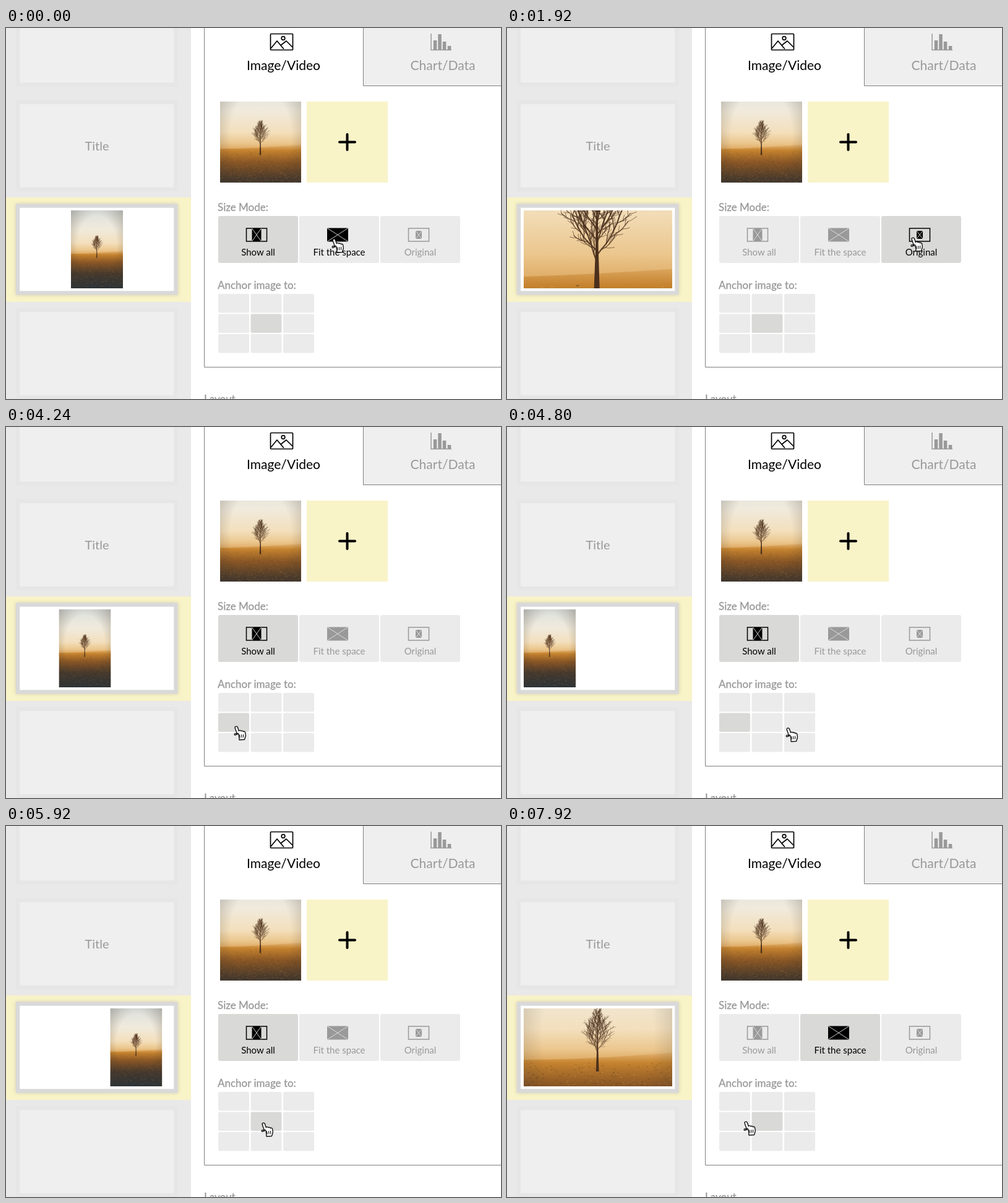
An HTML page that plays this animation: 800 by 600 pixels, repeating every 8 s.

```html
<!DOCTYPE html>
<html lang="en">
<head>
<meta charset="utf-8">
<title>Image size mode and anchor</title>
<style>
  html, body { margin: 0; width: 100%; height: 100%; overflow: hidden; background: #fff; }
  svg { display: block; }
  text { font-family: Lato, sans-serif; fill: #999; }
  .head { font-size: 21px; text-anchor: middle; }
  .label { font-size: 17px; stroke: #999; stroke-width: .3px; }
  .slide { fill: #efefef; stroke: #e6e6e6; stroke-width: 6.5px; }
  .slide.current { fill: #fff; stroke: #d9d9d9; filter: drop-shadow(0 0 3px #0002); }
  .edge { fill: none; stroke: #808080; }
  .box { fill: #ebebeb; }
  .on.box, .on .box { fill: #d9d9d7; }
  .mode { --ink: #999; }
  .mode.on, .mode.hover { --ink: #000; }
  .mode text { font-size: 15px; text-anchor: middle; fill: var(--ink); }
  .frame { fill: none; stroke: var(--ink); stroke-width: 1.5px; }
  .solid { fill: var(--ink); }
  .cross { stroke: #e4e4e4; stroke-width: .9px; }
</style>
</head>
<body>
<svg id="stage" width="800" height="600" viewBox="0 0 800 600">
  <defs>
    <linearGradient id="sky" x2="0" y2="1">
      <stop offset="0" stop-color="#dde1de"/>
      <stop offset=".4" stop-color="#f0eadc"/>
      <stop offset=".7" stop-color="#f3dfbc"/>
      <stop offset=".85" stop-color="#ebc68d"/>
      <stop offset="1" stop-color="#d39340"/>
    </linearGradient>
    <linearGradient id="field" x2="0" y2="1">
      <stop offset="0" stop-color="#d3974a" stop-opacity=".2"/>
      <stop offset=".1" stop-color="#c5832f"/>
      <stop offset=".3" stop-color="#8b5725"/>
      <stop offset=".6" stop-color="#47392c"/>
      <stop offset="1" stop-color="#27333b"/>
    </linearGradient>
    <radialGradient id="vignette" cx=".5" cy=".45" r=".75">
      <stop offset=".5" stop-color="#40372c" stop-opacity="0"/>
      <stop offset="1" stop-color="#40372c" stop-opacity=".4"/>
    </radialGradient>
    <symbol id="photo" viewBox="0 0 240 360" preserveAspectRatio="none">
      <rect width="240" height="216" fill="url(#sky)"/>
      <path d="M0 200Q110 200 240 188V360H0Z" fill="url(#field)"/>
      <g id="furrows"></g>
      <g id="tree" fill="none" stroke="#4b301d" stroke-linecap="round"></g>
      <rect width="240" height="360" fill="url(#vignette)"/>
    </symbol>
    <clipPath id="slideArea"><rect x="27" y="295" width="240" height="126"/></clipPath>
    <clipPath id="thumbArea"><rect x="346" y="119" width="131" height="131"/></clipPath>
  </defs>

  <rect width="299" height="600" fill="#e9e9e9"/>
  <rect y="274" width="299" height="169" fill="#f9f3c8"/>
  <rect class="slide" x="19" y="-43" width="255.5" height="134.5"/>
  <rect class="slide" x="19" y="120" width="255.5" height="141"/>
  <rect class="slide current" x="19" y="287.5" width="255.5" height="141"/>
  <rect class="slide" x="19" y="456" width="255.5" height="141"/>
  <text x="147" y="198" font-size="20" text-anchor="middle">Title</text>
  <g clip-path="url(#slideArea)"><use id="picture" href="#photo"/></g>

  <rect x="577" y="-2" width="230" height="96" fill="#efefef"/>
  <path class="edge" d="M320.5 0V548.5H800M577.5 0V93.5H800"/>
  <g fill="none" stroke="#000" stroke-width="1.7" stroke-linejoin="round">
    <rect x="427.500" y="9.500" width="36" height="26" rx="1"/>
    <path d="M428 33L438 21L449 34M444 28L453 21L463 31"/>
    <circle cx="448" cy="16.500" r="2.800"/>
  </g>
  <path d="M687 9V35.500H720M693.500 35V20M701 35V10M708.500 35V22M716.500 35V29"
    fill="none" stroke="#999" stroke-width="1.500"/>
  <path d="M693.500 35V20M701 35V10M708.500 35V22M716.500 35V29" stroke="#999" stroke-width="5.500"/>
  <text class="head" x="448.5" y="68" style="fill:#000">Image/Video</text>
  <text class="head" x="706" y="68">Chart/Data</text>

  <g clip-path="url(#thumbArea)"><use href="#photo" x="346" y="86" width="131" height="196.500"/></g>
  <rect x="486" y="119" width="131" height="131" fill="#f9f3c8"/>
  <path d="M539 184.500h25M551.500 172v25" stroke="#000" stroke-width="4" stroke-linecap="round"/>

  <text class="label" x="342" y="296">Size Mode:</text>
  <g id="modes"></g>
  <text class="label" x="342" y="422">Anchor image to:</text>
  <g id="cells"></g>
  <text class="label" x="320" y="606">Layout</text>

  <g id="cursor" stroke="#111" stroke-linejoin="round">
    <path d="M-6-10.500C-4.500-11.500-3-10.500-2.500-9L-.7-3.500C0-4.800 2.500-4.600 3-3.200C4-4.200 6-3.800 6.300-2.300C7.500-3.200 9.300-2.500 9.600-1L10.300 3C10.600 6 9 7.500 8.500 10.500L0 11C-1-8.500-4 5.500-7.500 3C-8.500 1.500-7 0-5 1L-3.200 2.300L-6.800-8C-7.200-9-7-10-6-10.500Z" fill="#fff" stroke-width="1.400"/>
    <path d="M.5 2.500l.8 5M3.500 2.300l.5 5M6.500 2l.2 5" stroke-width="1.100"/>
  </g>
</svg>
<script>
const LOOP = 8000, TICK = 80, MOVE = 440, SLIDE = 320;
const $ = id => document.getElementById(id);

// The pointer arrives at a spot, then its click picks a size mode or an anchor cell.
const STOPS = [
  { at: 0, x: 535, y: 352, click: 80, mode: 1 },
  { at: 1520, x: 661, y: 350, click: 1680, mode: 2 },
  { at: 2760, x: 416, y: 361, click: 2880, mode: 0 },
  { at: 3840, x: 377, y: 495, click: 4160, cell: 3 },
  { at: 4880, x: 467, y: 498, click: 5090, cell: 5 },
  { at: 5800, x: 421, y: 491, click: 5860, cell: 4 },
  { at: 6560, x: 537, y: 363, click: 6720, mode: 1 },
  { at: 7720, x: 391, y: 489 }
];
const WIDTHS = [84, 240, 560];

let seed = 11;
const rand = (lo, hi) => {
  seed = seed * 16807 % 2147483647;
  return lo + seed / 2147483647 * (hi - lo);
};
const clamp = p => Math.max(0, Math.min(1, p));
const smooth = p => p * p * (3 - 2 * p);
const mix = (a, b, p) => a + (b - a) * p;

// A straight tapered trunk; every limb carries shorter limbs that bend upwards.
function drawTree() {
  const levels = ["", "", ""];
  const limb = (x, y, angle, length, depth) => {
    const parts = 7 - depth * 2;
    let d = `M${x.toFixed(1)} ${y.toFixed(1)}`;
    for (let i = 1; i <= parts; i++) {
      angle = angle * .9 + rand(-.14, .14);
      x += Math.sin(angle) * length / parts;
      y -= Math.cos(angle) * length / parts;
      d += `L${x.toFixed(1)} ${y.toFixed(1)}`;
      if (depth < 2) {
        const side = i % 2 ? 1 : -1;
        limb(x, y, angle + side * rand(.4, .9), length * rand(.25, .45), depth + 1);
      }
    }
    levels[depth] += d;
  };
  for (let i = 0; i < 18; i++) {
    const h = i / 17, side = i % 2 ? 1 : -1;
    limb(119, 188 - h * 62, side * rand(.35, .85), mix(36, 9, h) * rand(.8, 1.1), 0);
  }
  $("tree").innerHTML =
    `<path d="M116.800 219L118.300 180L119.300 119L120.300 180L121.500 219Z" fill="#4b301d" stroke="none"/>` +
    levels.map((d, i) => `<path d="${d}" stroke-width="${.9 * .65 ** i}" opacity="${.9 - i * .1}"/>`).join("");
}

function drawFurrows() {
  const strokes = (count, color) => {
    let d = "";
    for (let i = 0; i < count; i++) {
      const depth = rand(0, 1);
      d += `M${rand(0, 240).toFixed(1)} ${(204 + depth * 150).toFixed(1)}h${(2 + depth * 5).toFixed(1)}`;
    }
    return `<path d="${d}" stroke="${color}" stroke-width=".9" opacity=".4"/>`;
  };
  $("furrows").innerHTML = strokes(350, "#d79a50") + strokes(350, "#37291d");
}

const modeX = i => 343 + i * 131;

function drawControls() {
  const blocks = [[15, 21], [34, 22], [10, 13]];
  $("modes").innerHTML = ["Show all", "Fit the space", "Original"].map((name, i) => {
    const mid = modeX(i) + 62, [w, h] = blocks[i], x = mid - w / 2, y = 334.5 - h / 2;
    const frame = i === 1 ? "" : `<rect class="frame" x="${mid - 16.5}" y="324" width="33" height="21"/>`;
    return `<g class="mode"><rect class="box" x="${modeX(i)}" y="304" width="129" height="76" rx="3"/>${frame}` +
      `<rect class="solid" x="${x}" y="${y}" width="${w}" height="${h}"/>` +
      `<path class="cross" d="M${x} ${y}l${w} ${h}m0 ${-h}l${-w} ${h}"/>` +
      `<text x="${mid + 2.5}" y="368">${name}</text></g>`;
  }).join("");
  $("cells").innerHTML = Array.from({ length: 9 }, (_, i) =>
    `<rect class="box" x="${343 + i % 3 * 52.5}" y="${430 + Math.floor(i / 3) * 32.5}" width="50" height="30.5" rx="2.5"/>`
  ).join("");
}

function stateAt(t) {
  const s = { mode: 0, cell: 4, column: 1, x: STOPS[0].x, y: STOPS[0].y };
  for (const stop of STOPS) {
    const p = smooth(clamp((t - stop.at) / MOVE + 1));
    s.x = mix(s.x, stop.x, p);
    s.y = mix(s.y, stop.y, p);
    if (!(t >= stop.click)) continue;
    s.mode = stop.mode ?? s.mode;
    if ("cell" in stop) {
      s.cell = stop.cell;
      s.column = mix(s.column, stop.cell % 3, clamp((t - stop.click) / SLIDE));
    }
  }
  return s;
}

function render(t) {
  const { mode, cell, column, x, y } = stateAt(t);
  const w = WIDTHS[mode];
  const cx = 147 + (column - 1) * (240 - w) / 2;
  const box = { x: cx - w / 2, y: 358 - w * .75, width: w, height: w * 1.5 };
  for (const key in box) $("picture").setAttribute(key, box[key]);
  $("cursor").setAttribute("transform", `translate(${x} ${y})`);

  const tipX = x - 6, tipY = y - 10;
  [...$("modes").children].forEach((el, i) => {
    const left = modeX(i);
    el.classList.toggle("on", i === mode);
    el.classList.toggle("hover", tipX >= left && tipX <= left + 129 && tipY >= 304 && tipY <= 380);
  });
  [...$("cells").children].forEach((el, i) => el.classList.toggle("on", i === cell));
}

drawTree();
drawFurrows();
drawControls();

const start = performance.now();
function tick() {
  const t = (performance.now() - start) % LOOP;
  render(Math.floor(t / TICK) * TICK);
  requestAnimationFrame(tick);
}
tick();
</script>
</body>
</html>
```
